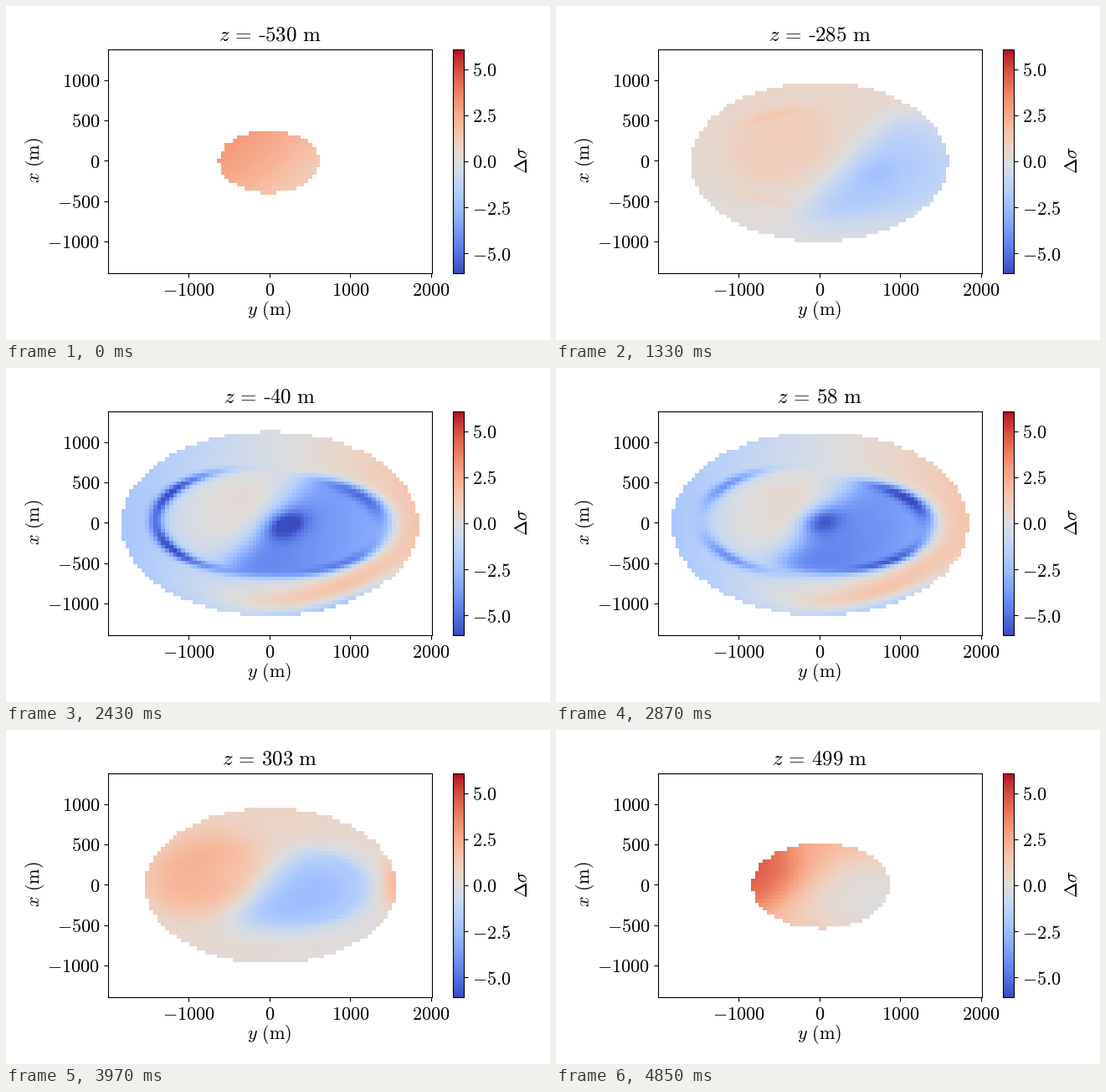
These frames come from a looping animation (650x400 px, 5070 ms). A matplotlib script:

```python
import numpy as np
import matplotlib.pyplot as plt
from matplotlib.animation import FuncAnimation
from matplotlib.lines import Line2D

W, H, LOOP, STEPS = 650, 400, 5070, 23
CELL, LIMIT = 0.049, 6.08           # km, colour range
DEPTH = 563                         # vertical half axis of the body, m

plt.rcParams.update({
    "font.size": 16, "mathtext.fontset": "cm", "axes.linewidth": 0.8,
    "font.family": "DejaVu Serif",
})

COL, ROW = np.meshgrid(np.arange(-37, 38), np.arange(-23, 24))
Y, X = COL * CELL, ROW * CELL


def bump(z, centre, width):
    return np.exp(-((z - centre) / width) ** 2)


def step(u):
    return 0.5 + 0.5 * np.tanh(u / 2)


def blob(cy, cx, a, b, power=2, tilt=0.3):
    dy, dx = Y - cy, X - cx
    u = dy * np.cos(tilt) + dx * np.sin(tilt)
    v = dx * np.cos(tilt) - dy * np.sin(tilt)
    return np.exp(-np.hypot(u / a, v / b) ** power)


def shell(cy, cx, a, b):
    """Plane scaled so that the ellipse becomes the unit circle."""
    return (Y - cy) / a + 1j * (X - cx) / b


def arc(plane, degrees, spread, radius=1.0, width=0.075):
    turn = np.angle(plane * np.exp(-1j * np.radians(degrees)))
    return np.exp(-((abs(plane) - radius) / width) ** 2 - (turn / spread) ** 2)


def background(z):
    s2 = (z / 400) ** 2
    slope = max(1 - 2 * s2, -1)
    return -0.3 + 1.3 * s2 + slope * Y + 0.6 * s2 * X


def left_side(z):
    """Raised lobe, wrapped by a shell with one arc on each flank."""
    lobe = blob(-0.65 - 0.0006 * z, 0.13, 0.72, 0.5, power=4)
    a = 1.28 + 0.0005 * z
    plane = shell(-0.15, 0.03, a, 0.52 * a)
    off = abs(z + 20)
    apart, spread = 32 + 0.12 * off, max(0.4, 0.65 - 0.0025 * off)
    arcs = arc(plane, 180 - apart, spread) + arc(plane, 180 + apart, spread)
    strength = 2.7 * bump(z, -383, 80) - 5 * bump(z, -20, 110)
    return (1.1 + 0.0015 * z) * lobe + strength * arcs


def right_side(z):
    """Lowered wedge inside a shrinking shell, with a core and two arcs."""
    a = 1.32 - 0.0009 * z
    plane = shell(0.12, -0.03, a, 0.47 * a)
    divide = 0.0018 * max(0, -40 - z) - 0.05
    wedge = (step((1 - abs(plane)) / (0.04 + 0.0004 * abs(z)))
             * step((Y - 0.9 * X - divide) / 0.14))
    core = blob(0.1 - 0.002 * z, 0.0005 * z, 0.25, 0.16)
    arcs = (4 * arc(plane, 35, 0.55, 0.95, 0.1)
            + 3.2 * arc(plane, -50, 0.55, 0.95, 0.08))
    return -(4.4 * bump(z, 40, 400) * wedge + 3.5 * bump(z, 0, 200) * core
             + bump(z, 58, 170) * arcs)


def rim(z, size):
    plane = shell(0, 0, 1.84 * size, 1.14 * size)
    return (1.3 * bump(z, 0, 220) * arc(plane, -75, 0.8, 0.84, 0.13)
            - 3.2 * bump(z, 0, 110) * arc(plane, -62, 0.5, 1.02, 0.1)
            + 2.1 * bump(z, 303, 120) * arc(plane, 0, 0.32, 1.0, 0.13))


def field(z):
    size = np.sqrt(1 - (z / DEPTH) ** 2)
    value = background(z) + left_side(z) + right_side(z) + rim(z, size)
    outside = np.hypot((COL + 0.1 - 0.0005 * z) / (37.5 * size),
                       (ROW + 0.22) / (23.32 * size)) > 1
    return np.ma.array(value, mask=outside)


def px(x, y):
    return x / W, 1 - y / H


def box(left, top, right, bottom):
    return [left / W, 1 - bottom / H, (right - left) / W, (bottom - top) / H]


def label(x, y, text, **style):
    return fig.text(*px(x, y), text, ha="center", **style)


def numbers(values, form):
    return [f"${form.format(v)}$" for v in values]


fig = plt.figure(figsize=(W / 100, H / 100), dpi=100, facecolor="white")
ax = fig.add_axes(box(122, 52, 509, 320))
half_w, half_h = 37.5 * CELL * 1000, 23.5 * CELL * 1000
image = ax.imshow(field(-530), cmap="coolwarm", vmin=-LIMIT, vmax=LIMIT,
                  origin="lower", interpolation="nearest", aspect="auto",
                  extent=[6 - half_w, 6 + half_w, -half_h, half_h])
ax.set(xlim=(-1992, 2010), ylim=(-1394, 1378))
xticks, yticks = range(-1000, 2001, 1000), range(-1000, 1001, 500)
ax.set_xticks(xticks, numbers(xticks, "{:d}"))
ax.set_yticks(yticks, numbers(yticks, "{:d}"))

bar = fig.colorbar(image, cax=fig.add_axes(box(534, 52, 547, 320)))
levels = np.linspace(-5, 5, 5)
bar.set_ticks(levels, labels=numbers(levels, "{:.1f}"))

label(315, 365, r"$y\ \mathrm{(m)}$", va="center")
label(35, 185, r"$x\ \mathrm{(m)}$", va="center", rotation=90)
label(617, 184.5, r"$\Delta\sigma$", va="center", rotation=90)
title = label(315, 41.8, "", va="baseline", fontsize=18)
hyphen = fig.add_artist(Line2D([], [], color="black", lw=1.0,
                               solid_capstyle="butt"))


def draw(k):
    z = -530 + 49 * max(0, k - 1)    # the first slice is held twice as long
    image.set_data(field(z))
    gap = r"\hspace{0.38}" if z < 0 else ""
    title.set_text(rf"$z\,=\,{gap}{abs(z)}\ \mathrm{{m}}$")
    start = 302 + 6.2 * (3 - len(str(abs(z))))
    hyphen.set_data(*zip(px(start, 36.4), px(start + 6.6, 36.4)))
    hyphen.set_visible(z < 0)
    return image, title, hyphen


anim = FuncAnimation(fig, draw, frames=STEPS, interval=LOOP / STEPS,
                     repeat=True, repeat_delay=0, blit=False)
plt.show()
```
